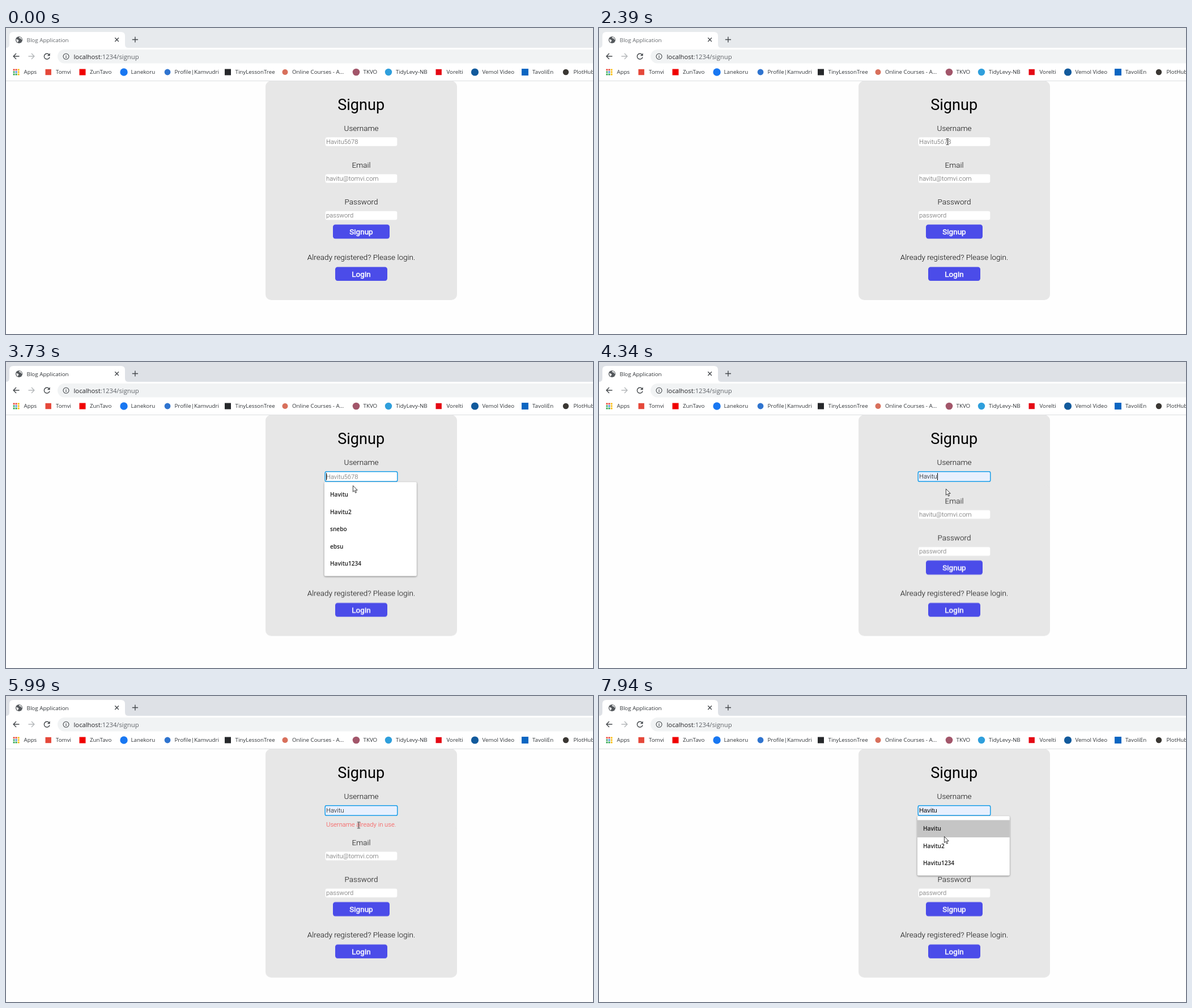
An HTML page that plays this animation: 1036x541 px, repeating every 8 s.

```html
<!DOCTYPE html>
<html lang="en">
<head>
<meta charset="utf-8">
<title>Signup form</title>
<style>
html, body { margin: 0; width: 100%; height: 100%; overflow: hidden; background: #fefefe; }
svg { display: block; width: 100%; height: 100%; }

.ui { font-family: "Open Sans", "Noto Sans", sans-serif; font-size: 9.75px; fill: #303438; }
.form { font-family: Roboto, Arial, sans-serif; font-weight: 300; font-size: 13.53px; fill: #080808; }
.mid { text-anchor: middle; }
.small { font-size: 11.22px; }
.hint { fill: #606060; }
.btn { font-weight: 400; font-size: 13.5px; fill: #fff; stroke: #fff; stroke-width: .5; }
.line { fill: none; stroke: #45494d; stroke-width: 1.4; }
.menu { font-size: 10.1px; font-weight: 600; fill: #1c1c1c; }
.menu .box { fill: #fff; filter: drop-shadow(0 1px 1.5px rgba(0,0,0,.45)); }

/* all switches run on one 8 s clock: 1% = 80 ms */
.sw { animation: 8s step-end infinite; }
.strip { animation-name: strip; }
.title { animation-name: title; }
.lower { animation-name: lower; }
.name-hint { animation-name: nameHint; }
.focus { animation-name: focus; }
.value { animation-name: value; }
.preview { animation-name: preview; }
.caret-a { animation-name: caretA; }
.caret-b { animation-name: caretB; }
.menu-a { animation-name: menuA; }
.menu-b { animation-name: menuB; }
.hover { animation-name: preview; }
.error { animation-name: error; }
.click { animation-name: click; }
.arrow { animation-name: arrow; }
.beam { animation-name: beam; }
.pointer { animation: move 8s linear infinite; }

@keyframes strip { 0% { fill: #e7eaed } 34%, 100% { fill: #dee1e6 } }
@keyframes title { 0% { fill: #63676b } 34%, 100% { fill: #303438 } }
@keyframes lower {
  0% { transform: translateY(0) }
  34% { transform: translateY(3.4px) }
  58.5%, 100% { transform: translateY(16.8px) }
}
@keyframes nameHint {
  0% { transform: translateY(0); opacity: 1 }
  34% { transform: translateY(1.7px); opacity: 1 }
  47.2%, 100% { transform: translateY(1.7px); opacity: 0 }
}
@keyframes focus {
  0% { opacity: 0; fill: #fff }
  34% { opacity: 1; fill: #fff }
  47.2%, 100% { opacity: 1; fill: #e8f0fe }
}
@keyframes value { 0% { opacity: 0 } 54.25% { opacity: 1 } 96.4%, 100% { opacity: 0 } }
@keyframes preview {
  0%, 54.25% { opacity: 0 }
  47.2%, 96.4%, 100% { opacity: 1 }
}
@keyframes caretA {
  0%, 39.75%, 47.2%, 100% { opacity: 0 }
  34%, 46.1% { opacity: 1 }
}
@keyframes caretB {
  0%, 61%, 73.75%, 96.4%, 100% { opacity: 0 }
  54.25%, 67.4%, 80% { opacity: 1 }
}
@keyframes menuA { 0%, 54.25%, 100% { opacity: 0 } 34% { opacity: 1 } }
@keyframes menuB { 0% { opacity: 0 } 86.9%, 100% { opacity: 1 } }
@keyframes error { 0% { opacity: 0 } 58.5%, 100% { opacity: 1 } }
@keyframes click {
  0%, 35.6%, 54.25%, 89.5%, 100% { opacity: 0 }
  33.25%, 53.37%, 86% { opacity: 1 }
}
@keyframes arrow {
  0%, 4.8%, 29.3%, 60%, 80.6% { opacity: 0 }
  2.5%, 9.4%, 45.4%, 77.6%, 95.9%, 100% { opacity: 1 }
}
@keyframes beam {
  0%, 9.4%, 45.4%, 77.6%, 95.9%, 100% { opacity: 0 }
  4.8%, 29.3%, 60%, 80.6% { opacity: 1 }
}
@keyframes move {
  0%, 2.5% { transform: translate(957px, 528px) }
  4.87%, 8.6% { transform: translate(634px, 266px) }
  10.5% { transform: translate(517px, 195px) }
  11.5% { transform: translate(521px, 148px) }
  13.3% { transform: translate(600px, 73px) }
  15% { transform: translate(700px, 115px) }
  16.5% { transform: translate(737px, 230px) }
  17.75%, 21.5% { transform: translate(725px, 331px) }
  29.75%, 42.8% { transform: translate(615px, 201px) }
  46.6% { transform: translate(612px, 218px) }
  48.2%, 58.6% { transform: translate(612px, 224px) }
  60.8% { transform: translate(569px, 229px) }
  63.9% { transform: translate(619px, 226px) }
  67.4% { transform: translate(642px, 229px) }
  70% { transform: translate(655px, 230px) }
  73.8% { transform: translate(626px, 231px) }
  77.5% { transform: translate(614px, 222px) }
  83.4%, 95% { transform: translate(611px, 205px) }
  99.2%, 100% { transform: translate(609px, 248px) }
}
</style>
</head>
<body>
<svg viewBox="0 0 1036 541" xmlns="http://www.w3.org/2000/svg">
  <!-- browser window -->
  <rect class="sw strip" width="1036" height="36"/>
  <rect y="35" width="1036" height="58" fill="#fff"/>
  <path d="M0 35Q6 35 6 29V14Q6 7 13 7H203Q210 7 210 14V29Q210 35 216 35Z" fill="#fff"/>
  <circle cx="23" cy="21" r="6.1" fill="#54585c"/>
  <path d="M18.2 19.6l3.6 1.4 .6 1.8-1.4 1.4v1.6q-3-1.6-2.8-6.2M22.6 16.4l1 1.8h2l1.4 2 1.2 1.4q-.2-4-3.2-5.4z" fill="#fff"/>
  <path class="line" d="M192.3 17.3l6.6 6.6m0-6.6l-6.6 6.6M222.8 20.5h10.2M227.9 15.4v10.2"/>

  <path class="line" d="M23.5 50H13.2M18 45.1L13.1 50l4.9 4.9"/>
  <path class="line" style="stroke:#b5b8bb" d="M39.5 50h10.3M45 45.1l4.9 4.9-4.9 4.9"/>
  <path class="line" d="M75.9 46.9A4.9 4.9 0 1 0 77 51.5"/>
  <path d="M77.6 44.4v4.9h-4.9z" fill="#45494d"/>
  <rect x="91" y="38" width="990" height="24.5" rx="12.2" fill="#f1f3f4"/>
  <circle class="line" style="stroke-width:1.1" cx="106" cy="50.3" r="5"/>
  <path class="line" style="stroke-width:1.2" d="M106 49.6v3.4M106 47.4v1.2"/>

  <g class="ui">
    <text class="sw title" x="36.5" y="24.5" style="font-size:9.85px">Blog Application</text>
    <text x="119.5" y="54.6" style="font-size:11.25px" fill="#202124">localhost<tspan fill="#5f6368">:1234/signup</tspan></text>

    <path fill="#ea4335" d="M12.6 72.4h2.9v2.9h-2.9zM16.6 72.4h2.9v2.9h-2.9z"/>
    <path fill="#fbbc04" d="M20.7 72.4h2.9v2.9h-2.9zM20.7 76.4h2.9v2.9h-2.9zM20.7 80.5h2.9v2.9h-2.9z"/>
    <path fill="#34a853" d="M12.6 76.4h2.9v2.9h-2.9zM12.6 80.5h2.9v2.9h-2.9zM16.6 80.5h2.9v2.9h-2.9z"/>
    <path fill="#4285f4" d="M16.6 76.4h2.9v2.9h-2.9z"/>

    <rect x="69.5" y="72.8" width="10.4" height="10.4" fill="#e5483a"/>
    <rect x="129.5" y="72.5" width="11" height="11" fill="#f00000"/>
    <circle cx="208" cy="78" r="6.7" fill="#1877f2"/>
    <circle cx="285" cy="78" r="5.4" fill="#2f74cf"/>
    <rect x="386" y="72.5" width="11" height="11" fill="#26282b"/>
    <circle cx="492.5" cy="78" r="5" fill="#d8705c"/>
    <circle cx="618" cy="78" r="6.3" fill="#a2566a"/>
    <circle cx="675" cy="78" r="6.2" fill="#2f9fdc"/>
    <rect x="758.5" y="72.8" width="10.4" height="10.4" fill="#e50914"/>
    <circle cx="827.5" cy="78" r="6.6" fill="#125a9c"/>
    <rect x="910" y="72" width="12" height="12" fill="#0a66c2"/>
    <circle cx="988" cy="78" r="5.2" fill="#3a3733"/>

    <text x="31.5" y="81.4">Apps</text>
    <text x="88" y="81.4">Tomvi</text>
    <text x="148" y="81.4">ZunTavo</text>
    <text x="220.5" y="81.4">Lanekoru</text>
    <text x="297.5" y="81.4">Profile|Kamvudri</text>
    <text x="404.5" y="81.4">TinyLessonTree</text>
    <text x="505" y="81.4">Online Courses - A...</text>
    <text x="630.5" y="81.4">TKVO</text>
    <text x="688" y="81.4">TidyLevy-NB</text>
    <text x="777.5" y="81.4">Vorelti</text>
    <text x="840.5" y="81.4">Vemol Video</text>
    <text x="929" y="81.4">TavoliEn</text>
    <text x="1001.5" y="81.4">PlotHuben</text>
  </g>
  <rect y="93" width="1036" height="1" fill="#dcdee1"/>

  <!-- form -->
  <g class="form">
    <rect x="458" y="93.5" width="338" height="300" rx="10" fill="#e7e7e7"/>
    <text class="mid" x="626.7" y="145" style="font-size:27.1px;font-weight:400" fill="#000">Signup</text>
    <text class="mid" x="627" y="181.7">Username</text>

    <g class="sw lower">
      <rect x="458" y="214" width="338" height="267" rx="10" fill="#e7e7e7"/>
      <text class="mid" x="627" y="246.7">Email</text>
      <rect x="563.7" y="258.5" width="126.6" height="15.3" rx="3" fill="#fff"/>
      <text class="small hint" x="565" y="270.2">havitu@tomvi.com</text>
      <text class="mid" x="627" y="312.2">Password</text>
      <rect x="563.7" y="323.7" width="126.6" height="15.5" rx="3" fill="#fff"/>
      <text class="small hint" x="565" y="335.2">password</text>
      <rect x="577" y="347.5" width="100" height="25" rx="4.2" fill="#4b4ce9"/>
      <text class="mid btn" x="627" y="364.8">Signup</text>
      <text class="mid" x="627" y="410.3">Already registered? Please login.</text>
      <rect x="581" y="422.4" width="92" height="24.6" rx="4.2" fill="#4b4ce9"/>
      <text class="mid btn" x="627" y="439.8">Login</text>
    </g>

    <rect x="563.7" y="193.2" width="126.6" height="15.5" rx="3" fill="#fff"/>
    <rect class="sw focus" x="563.2" y="193.8" width="127.6" height="17.5" rx="2.6" stroke="#1a9ee8" stroke-width="1.5"/>
    <text class="sw small hint name-hint" x="565" y="204.7">Havitu5678</text>
    <text class="sw small value" x="565" y="206.4">Havitu</text>
    <text class="sw small preview" x="565" y="206.4" style="font-family:'Liberation Sans',Arial,sans-serif;font-weight:400">Havitu</text>
    <rect class="sw caret-a" x="565" y="196.3" width="1" height="12.7" fill="#000"/>
    <rect class="sw caret-b" x="597" y="196.3" width="1" height="12.7" fill="#000"/>
    <text class="sw small error" x="565" y="231" fill="#fa4444">Username already in use.</text>
  </g>

  <!-- suggestions -->
  <g class="ui menu sw menu-a">
    <rect class="box" x="561.8" y="212.2" width="163" height="166.3" rx="2"/>
    <rect class="sw hover" x="561.8" y="219.4" width="163" height="30.5" fill="#c5c5c5"/>
    <text x="572" y="238.3">Havitu</text>
    <text x="572" y="268.8">Havitu2</text>
    <text x="572" y="299.3">snebo</text>
    <text x="572" y="329.8">ebsu</text>
    <text x="572" y="360.3">Havitu1234</text>
  </g>
  <g class="ui menu sw menu-b">
    <rect class="box" x="561.8" y="212.2" width="163" height="105.3" rx="2"/>
    <rect class="sw hover" x="561.8" y="219.4" width="163" height="30.5" fill="#c5c5c5"/>
    <text x="572" y="238.3">Havitu</text>
    <text x="572" y="268.8">Havitu2</text>
    <text x="572" y="299.3">Havitu1234</text>
  </g>

  <g class="pointer">
    <circle class="sw click" cy="-.5" r="9.8" fill="#f0ec3c" fill-opacity=".66"/>
    <path class="sw arrow" d="M.4 .4V11.4L2.9 9.1 4.7 13.2 6.5 12.4 4.7 8.4H8.2Z" fill="#fff" stroke="#222" stroke-width=".9"/>
    <path class="sw beam" d="M-2.4-5.3H-.6L0-4.8.6-5.3H2.4M0-4.8V4.8M-2.4 5.3H-.6L0 4.8.6 5.3H2.4" fill="none" stroke="#222" stroke-width="1"/>
  </g>
</svg>
</body>
</html>
```
